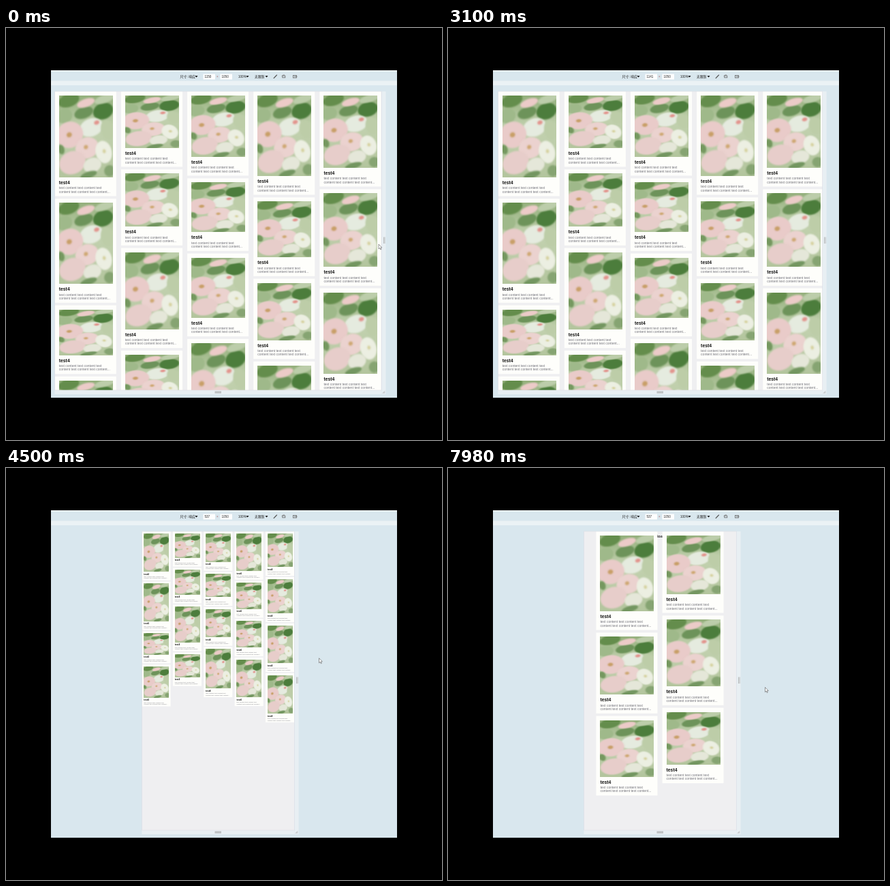
An HTML page with a canvas that plays this animation: 640x604 px, repeating every 8 s.

```html
<!DOCTYPE html>
<html lang="zh">
<head>
<meta charset="utf-8">
<title>Masonry layout</title>
<style>
html, body { margin: 0; width: 100%; height: 100%; overflow: hidden; background: #000; }
canvas { display: block; }
</style>
</head>
<body>
<canvas id="stage" width="640" height="604"></canvas>
<script>
const ctx = document.getElementById('stage').getContext('2d');
const LOOP = 8000;
const SANS = '"Liberation Sans", Arial, sans-serif';
const CJK = '"Noto Sans CJK SC", "Noto Sans CJK", sans-serif';
const CENTER = 311.5, TOP = 93, BOTTOM = 531;
const PX = 0.4174;              // stage pixels per viewport pixel
const CARD = 90, PITCH = 97.15, PAD = 6, IMAGE = 79;
const RELOAD = 4640, FIRST_CARD = 4860, CARD_DELAY = 560;

// Image heights per column
const WIDE = [
  [120, 119, 67, 98], [77, 78, 113, 72], [90, 73, 88, 124],
  [118, 82, 84, 119], [106, 108, 119, 121]
];
const NARROW = [[111, 85, 83], [86, 98, 77]];

function rect(x, y, w, h, color) {
  ctx.fillStyle = color;
  ctx.fillRect(x, y, w, h);
}

function text(str, x, y, size, color = '#222', family = SANS, weight = '') {
  ctx.font = `${weight} ${size}px ${family}`;
  ctx.fillStyle = color;
  ctx.fillText(str, x, y);
}

function path(points, color, fill = true, width = 0.8) {
  ctx.beginPath();
  points.forEach(([x, y]) => ctx.lineTo(x, y));
  if (fill) { ctx.fillStyle = color; ctx.fill(); }
  else { ctx.strokeStyle = color; ctx.lineWidth = width; ctx.stroke(); }
}

// Linear interpolation through [time, value, value...] keys
function track(t, keys) {
  const i = keys.findIndex(key => key[0] > t);
  if (i === 0) return keys[0].slice(1);
  if (i < 0) return keys[keys.length - 1].slice(1);
  const a = keys[i - 1], b = keys[i];
  const k = (t - a[0]) / (b[0] - a[0]);
  return a.slice(1).map((v, n) => v + (b[n + 1] - v) * k);
}

// Soft impression of pink blossoms under green leaves
function makePhoto() {
  const photo = document.createElement('canvas');
  photo.width = 158;
  photo.height = 220;
  const p = photo.getContext('2d');
  const sky = p.createLinearGradient(0, 0, 0, 220);
  sky.addColorStop(0, '#94b07c');
  sky.addColorStop(0.4, '#c3d2b0');
  sky.addColorStop(1, '#b3c59d');
  p.fillStyle = sky;
  p.fillRect(0, 0, 158, 220);
  p.filter = 'blur(2px)';
  const blobs = [
    [.18, .06, .2, .08, '#648d4c'], [.1, .25, .15, .09, '#9fb98a'],
    [.46, .21, .18, .07, '#6d935a'], [.82, .19, .19, .1, '#4c7d3c'],
    [.85, .04, .2, .05, '#bccdaa'], [.5, .09, .17, .05, '#eccbc8'],
    [.6, .39, .22, .11, '#e5ebdf'], [.9, .42, .12, .12, '#bdcda8'],
    [.2, .48, .25, .16, '#e9cbc9'], [.52, .64, .22, .13, '#ebd2cf'],
    [.25, .82, .25, .14, '#e7cdca'], [.83, .69, .15, .14, '#ecefe2'],
    [.62, .85, .17, .09, '#e5e7d9'], [.55, .97, .16, .04, '#739660'],
    [.94, .92, .1, .07, '#86a472'], [.04, .66, .06, .06, '#75985f']
  ];
  const spots = [
    [.19, .48, .05, .03, '#c89f68'], [.5, .63, .04, .025, '#cea873'],
    [.7, .33, .05, .025, '#e2938c'], [.84, .68, .03, .025, '#d6d2a0']
  ];
  for (const [x, y, rx, ry, color] of [...blobs, ...spots]) {
    p.fillStyle = color;
    p.beginPath();
    p.ellipse(x * 158, y * 220, rx * 158, ry * 220, -0.3, 0, 7);
    p.fill();
  }
  return photo;
}
const photo = makePhoto();

function card(x, y, h) {
  const left = x + PAD, end = y + PAD + h;
  rect(x, y, CARD, h + PAD + 27.5, '#fefefb');
  ctx.drawImage(photo, left, y + PAD, IMAGE, h);
  text('test4', left, end + 10, 6.8, '#111', SANS, 'bold');
  text('text content text content text', left, end + 17.2, 5, '#74747c');
  text('content text content text content...', left, end + 22.6, 5, '#74747c');
}

function columns(heights, x, visible = () => true) {
  heights.forEach((column, c) => {
    let y = 0;
    column.forEach((h, row) => {
      if (visible(row * heights.length + c)) card(x + c * PITCH, y, h);
      y += h + 37.3;
    });
  });
}

function arrow(x, y) {
  path([[x - 2, y], [x + 2, y], [x, y + 2.6]], '#111');
}

function toolbar(width) {
  rect(66, 62, 508, 480, '#d9e7ee');
  rect(66, 62, 508, 1.5, '#f2f7f9');
  rect(66, 77.5, 508, 6.5, '#ebf2f5');
  text('尺寸: 响应', 255.5, 73.3, 5, '#222', CJK);
  arrow(279.5, 70);
  rect(289.5, 67.5, 17.5, 8, '#fdfefe');
  rect(314.5, 67.5, 17.5, 8, '#fdfefe');
  text(Math.round(width), 291.5, 73.2, 4.6);
  text('×', 309, 73.2, 4.6, '#a66');
  text('1050', 316.5, 73.2, 4.6);
  text('100%', 341, 73.2, 4.6);
  arrow(354.5, 70);
  text('无限制', 365, 73.3, 4.8, '#222', CJK);
  arrow(382.5, 70);
  path([[392.8, 73.8], [396, 70.5], [397.8, 68.7]], '#555', false, 1.2);
  ctx.strokeStyle = '#666';
  ctx.lineWidth = 0.8;
  ctx.strokeRect(405.8, 70, 4, 2.8);
  path([[405, 70.5], [406.5, 69], [409, 69]], '#666', false);
  ctx.strokeRect(421.5, 69.5, 5, 3.5);
  path([[423, 71.2], [427.5, 71.2]], '#666', false);
}

function page(t, width) {
  const w = width * PX, left = CENTER - w / 2, right = left + w;
  rect(right, TOP, 6, BOTTOM - TOP + 6, '#e8eff3');
  rect(left, BOTTOM, w, 6, '#e8eff3');
  rect(306.5, 532.8, 9.5, 0.7, '#888');
  rect(306.5, 534.6, 9.5, 0.7, '#888');
  rect(right + 2.6, 306.5, 0.6, 9.5, '#999');
  rect(right + 4.2, 306.5, 0.6, 9.5, '#999');
  path([[right + 1.5, 535.5], [right + 4.5, 532.5]], '#888', false, 0.6);
  path([[right + 3.2, 535.7], [right + 4.7, 534.2]], '#888', false, 0.6);

  ctx.save();
  ctx.beginPath();
  ctx.rect(left, TOP, w, BOTTOM - TOP);
  ctx.clip();
  rect(left, TOP, w, BOTTOM - TOP, '#efeff1');
  ctx.translate(left, TOP);
  if (t < RELOAD) {
    const zoom = w > 470 ? 1 : w / 480;
    ctx.scale(zoom, zoom);
    columns(WIDE, 0.3);
  } else {
    text('loading', 107, 9, 6, '#222', SANS, 'bold');
    columns(NARROW, 18, n => t >= FIRST_CARD + n * CARD_DELAY);
  }
  ctx.restore();
  ctx.strokeStyle = '#dddde4';
  ctx.lineWidth = 0.6;
  ctx.strokeRect(left, TOP, w, BOTTOM - TOP);
}

function pointer(x, y) {
  const shape = [[0, 0], [0, 7], [1.6, 5.5], [2.8, 8], [3.8, 7.5], [2.7, 5.2], [4.8, 5], [0, 0]]
    .map(([dx, dy]) => [x + dx, y + dy]);
  path(shape, '#fff');
  path(shape, '#555', false, 0.6);
}

function resizer(x, y) {
  path([[x - 4, y], [x + 4, y]], '#777', false, 0.7);
  for (const d of [-1, 1]) {
    path([[x + d * 2.2, y - 2], [x + d * 4.4, y], [x + d * 2.2, y + 2]], '#777', false, 0.7);
  }
  path([[x - 1.8, y - 4], [x - 1.8, y + 4]], '#777', false, 0.7);
}

function cursor(t, width) {
  const edge = CENTER + width * PX / 2;
  if (t < 680) {
    pointer(...track(t, [[0, 547, 317], [680, 558, 313]]));
  } else if (t < 2600) {
    resizer(559, 313);
  } else if (t > 3300 && t < 4200) {
    resizer(edge + 4.5, 310.5);
  } else if (t >= 4200 && t < 5240) {
    pointer(...track(t, [[4200, 429, 308], [4900, 500, 240], [5020, 502, 236], [5240, 572, 60]]));
  } else if (t >= 7560) {
    pointer(...track(t, [[7560, 549, 300], [7960, 465.5, 321.5]]));
  }
}

function draw() {
  const t = performance.now() % LOOP;
  const [width] = track(t, [
    [0, 1150], [2600, 1150], [3100, 1141], [3300, 1141], [3620, 540], [3800, 537]
  ]);
  rect(0, 0, 640, 604, '#000');
  ctx.save();
  ctx.beginPath();
  ctx.rect(66, 62, 508, 480);
  ctx.clip();
  toolbar(width);
  page(t, width);
  cursor(t, width);
  ctx.restore();
  requestAnimationFrame(draw);
}
draw();
</script>
</body>
</html>
```
